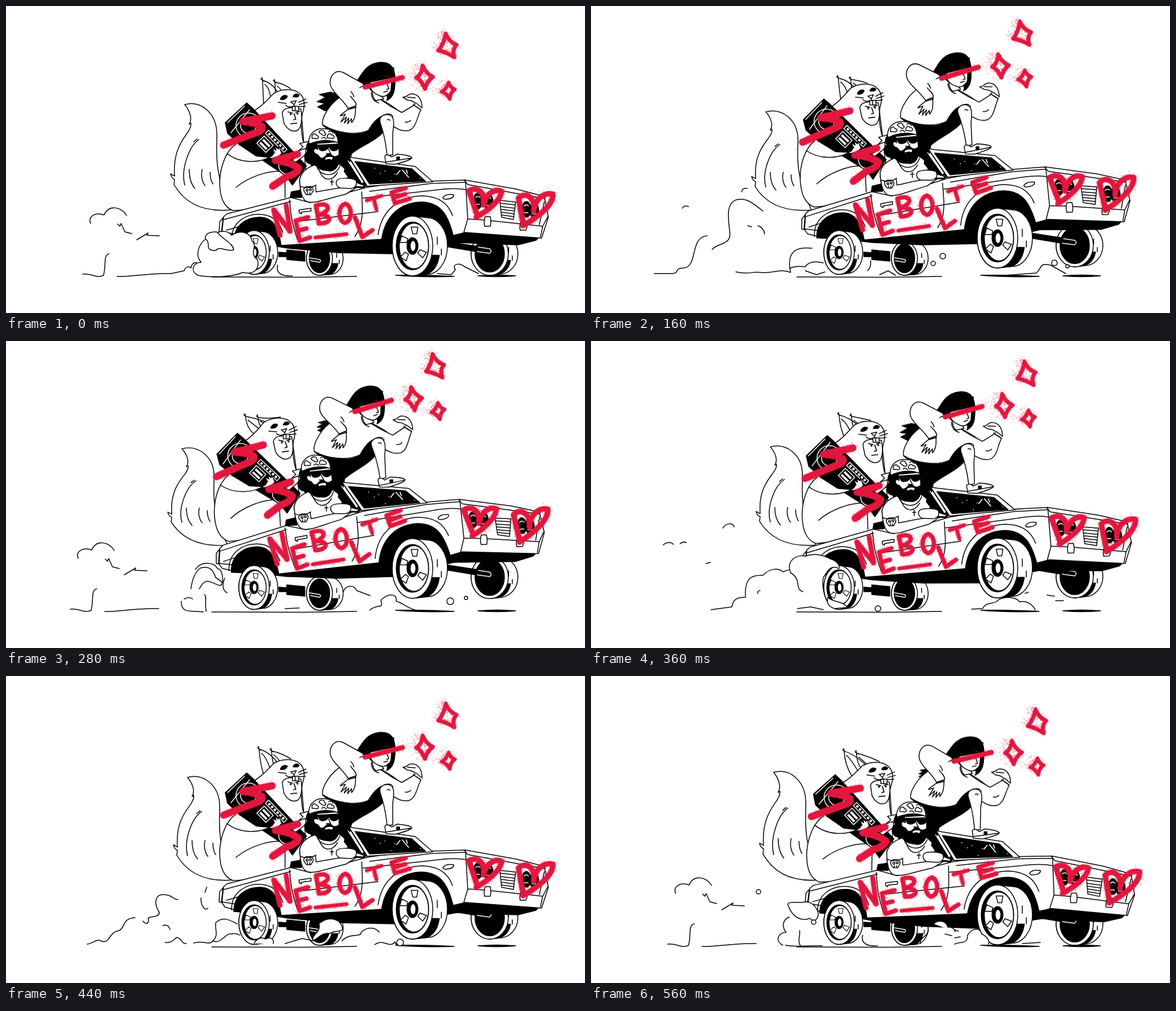
Animation of 1027 by 545 pixels, one loop 0.6 s. Source, as an HTML page:

```html
<!DOCTYPE html>
<html lang="en">
<head>
<meta charset="utf-8">
<title>Joyride</title>
<style>
html, body { margin: 0; width: 100%; height: 100%; overflow: hidden; background: #fff; }
svg { display: block; width: 100vw; height: 100vh; }
path, ellipse, circle, rect { fill: none; stroke: #000; stroke-width: 1.5; stroke-linejoin: round; stroke-linecap: round; }
.w { fill: #fff; }
.k { fill: #000; }
.i { stroke: #fff; }
.p { fill: #fff; stroke: none; }
.r path { stroke: #e3173e; }
</style>
</head>
<body>
<svg viewBox="0 0 1027 545" preserveAspectRatio="none">
  <!-- ground shadows -->
  <path d="M365 481L530 481.500L622 480"/>
  <path class="k" d="M691 478Q745 477 795 480Q740 482 691 478Z"/>
  <path class="k" d="M837 479Q870 476 904 479Q870 482 837 479Z"/>

  <g id="tail">
    <path class="w" d="M317 175C346 167 373 190 374 226C375 250 366 290 398 362C352 366 318 352 298 317L299 308Q293 305 292 298L299 302C297 270 304 250 319 229C325 221 329 214 328 208L325 210C331 200 326 186 317 175Z"/>
    <path d="M342 237C324 250 310 290 317 318M333 241L339 236M325 290C325 305 329 317 335 324M348 290C345 303 349 314 353 319M362 295Q362 308 367 316"/>
  </g>

  <g id="rearFar"></g>
  <path class="k" d="M484 437L498 438V433L530 436V453L498 450V445L484 445Z"/>
  <g id="frontFar"></g>

  <g id="rig">
    <!-- crouching rider -->
    <path id="lock" class="k" d="M602 160L575 153L556 157L567 162L552 170L566 173L553 179L566 186L590 185Z"/>
    <path class="w" d="M640 140C610 150 585 162 572 182C563 195 560 205 562 212C585 224 620 232 645 220C655 205 668 190 680 192L697 197C705 190 690 180 664 165L655 150Z"/>
    <path class="k" d="M562 211C590 228 625 232 642 222C650 208 660 196 672 194L668 225C655 240 630 248 613 262L606 292L585 292L590 240Z"/>
    <path class="w" d="M664 166L682 178L702 189L724 176L736 184C728 200 728 215 715 221C700 224 690 215 684 212L686 195"/>
    <path class="w" d="M724 176C729 171 720 168 712 167L704 162C712 162 712 157 718 156C731 155 738 166 738 181M712 162L726 163M722 175L735 184M727 172L738 181M708 206Q714 207 718 203"/>
    <path class="k" d="M617 139C630 128 634 102 664 100C686 99 690 114 690 130C690 150 688 162 675 168C682 155 660 145 648 150C640 140 628 136 617 139Z"/>
    <path class="w" d="M648 145C651 155 649 162 656 168L670 165L665 157M648 154C648 164 654 170 661 172"/>
    <path class="p" d="M645 136C646 150 655 156 660 158C668 164 678 158 682 150L684 128Z"/>
    <path d="M646 144C649 152 655 156 660 158C668 163 675 160 679 155"/>
    <path class="k" d="M641 136C650 126 672 130 686 124L688 110L650 108Z"/>
    <path class="k" d="M684 126C685 145 683 158 676 167C690 160 690 140 690 126Z"/>
    <path d="M676 139L679 147L675 148M670 153L677 151M648 133Q643 139 649 144"/>
    <path class="w" d="M634 138L598 118C584 112 574 124 575 138C577 152 597 165 607 182L621 177C622 170 615 166 611 160"/>
    <path class="w" d="M608 182C600 190 592 193 593 195L602 192L594 206L604 197L600 208L608 199L606 209L613 200L613 207C620 200 620 190 620 178ZM606 184L621 180M612 152Q616 156 617 161"/>

    <!-- squirrel suit -->
    <path class="w" d="M457 175C440 185 420 200 407 246C390 258 380 285 379 312C379 340 386 356 402 363C440 362 470 352 500 342L534 330L528 240L523 180Z"/>
    <path d="M408 322C428 305 465 290 495 294L495 340"/>
    <path id="ears" class="w"/>
    <path class="w" d="M440 186C455 178 465 165 475 155C490 146 515 145 525 160C530 168 530 180 526 190C522 205 524 225 527 240"/>
    <path class="w" d="M490 190C492 180 505 180 512 181L523 183C526 200 524 215 518 220C508 226 498 218 493 208Z"/>
    <path class="k" d="M487 164Q492 156 499 160Q497 167 487 166ZM509 161Q513 153 520 158Q519 163 509 161Z"/>
    <path class="w" d="M505 170L515 168L511 175ZM508 178H519V186H508ZM513 178V186"/>
    <path d="M511 175V178Q501 181 496 176M519 171L532 165M520 175L534 171M519 179L531 178M497 173L483 171"/>
    <path d="M500 188L508 190M514 189L521 187M511 191L514 201L510 202M505 209L516 208" style="stroke-width:1.7"/>
    <circle class="k" cx="505" cy="192" r="1"/><circle class="k" cx="517" cy="191" r="1"/>
    <path class="k" d="M427 172L437 181L533 284L508 318L497 302L470 284L415 247L393 226L389 207Z"/>
    <path class="i" d="M393 207L423 178M399 225L432 184"/>
    <g transform="translate(430 212) rotate(46)">
      <circle class="i" r="22"/><circle class="i" r="14"/><circle class="i" cx="99" r="15"/>
      <rect class="i" x="33" y="-7" width="23" height="18"/><rect class="p" x="36" y="-3" width="17" height="4"/><rect class="p" x="36" y="4" width="17" height="4"/>
      <rect class="i" x="31" y="-20" width="47" height="8"/><path class="i" d="M35 -16H74" stroke-dasharray="4 3" style="stroke-width:4;stroke-linecap:butt"/>
    </g>
    <path class="w" d="M392 262C415 280 450 280 472 266L476 260L472 252L479 256L477 249L483 254L484 249L487 256L489 262Q483 269 473 270"/>
    <path class="w" d="M528 244C532 255 535 262 526 268L514 277L507 274L513 270L506 269L516 265"/>
    <g class="r">
      <path data-w="12" d="M472 195L420 205Q440 206 454 214Q456 222 440 226L386 247"/>
      <path data-w="12" d="M517 263L478 274Q505 277 519 288Q516 298 498 303L473 320"/>
    </g>

    <!-- driver -->
    <path class="w" d="M538 240L521 244L527 250L519 257L540 250Z"/>
    <path class="k" d="M545 238C535 238 530 250 535 258C528 265 530 280 540 280C545 292 560 290 572 290L588 270L590 240Z"/>
    <path class="w" d="M548 282C530 288 522 298 521 310L523 338L600 335L607 300C604 290 598 285 590 280C580 296 560 296 548 282"/>
    <path d="M552 287C560 304 585 304 592 284M555 290C562 312 578 312 588 296M578 308V318M575 312H581"/>
    <path class="w" d="M551 244L590 241L591 268L575 280L556 272L553 264Q545 262 546 255Q549 251 553 255Z"/>
    <path class="k" d="M553 264L558 270C562 271 565 269 568 265Q573 261 577 264C581 269 586 268 591 264C593 282 585 292 575 293C560 292 554 280 553 264Z"/>
    <path class="k" d="M552 247L591 245C591 256 585 257 581 257C575 257 574 250 572 250C570 257 562 258 557 256Z"/>
    <path class="w" d="M571 252L576 262L568 262"/><path class="p" d="M566 270Q573 266 580 269L578 273Q573 270 567 273Z"/>
    <path class="w" d="M537 241C538 222 555 216 566 218C582 219 589 230 589 243C575 236 555 238 538 245Z"/>
    <path d="M543 235C541 227 549 224 551 230C557 230 554 238 549 235ZM555 224C558 218 566 220 565 225C571 228 564 232 560 228ZM570 234C569 228 575 224 577 229C583 228 584 236 578 235ZM560 235Q564 231 568 236M572 223Q578 220 580 226"/>

    <!-- car -->
    <path class="k" d="M405 414L488 422L668 410L800 395L948 408L940 416L908 424L800 420L690 440L590 438L500 430Z"/>
    <path class="k" d="M504 340L506 330L522 327L524 340Z"/>
    <path class="k" d="M604 272L634 318L612 310L600 294Z"/>
    <path class="w" d="M383 402L386 374L392 369L505 340L540 349L640 322C690 314 760 310 815 309L905 325L955 338L962 375L950 412L815 402L790 408L668 414L488 425L408 416L388 410Z"/>
    <path class="w" d="M608 268L620 270L726 285L757 312L640 320Z"/>
    <path class="k" d="M619 276L720 289L744 311L645 316Z"/>
    <path class="i" d="M664 297h.1M672 293h.1M690 298h.1M654 288h.1M683 310h.1M699 292L693 299M703 291L714 304M710 291L712 297M735 306h.1" style="stroke-width:1.7"/>
    <path class="i" d="M607 275L632 314"/>
    <path d="M608 268L640 319L634 322"/>
    <path d="M387 379L505 347M383 401L408 405M379 383L385 376L382 402L378 401ZM391 398L416 391M503 344C505 370 507 385 517 415M631 330L632 360C632 382 628 395 619 409M512 383L660 365M633 341L760 327Q795 322 815 326M645 329L755 315L815 313"/>
    <path class="w" d="M520 367V362L541 359V364L524 366V369ZM775 340Q780 333 794 335Q795 342 780 343Q775 343 775 340Z"/>
    <path class="k" d="M404 418C404 388 428 374 452 375C476 376 484 398 488 425Z"/>
    <path d="M400 415C400 382 428 368 453 370C476 372 485 385 491 402"/>
    <path class="k" d="M666 416C672 370 702 348 738 348C772 349 785 372 794 411L775 420L690 440Z"/>
    <path d="M660 406C666 362 698 338 738 337C768 338 784 350 792 372"/>
    <path d="M815 309L819 378L812 402M819 378L850 380L952 391L961 374M813 309L819 317L956 342M952 391L948 410M826 324L832 374M955 347L946 388"/>
    <path class="w" d="M876 345L904 348L900 379L879 375ZM876 350L903 353M877 356L902 359M878 361L902 364M878 366L901 369M879 371L901 374"/>
    <g id="lamps"></g>
    <path class="w" d="M850 374H859Q861 383 859 391H849Q847 382 850 374ZM914 382H924Q926 390 922 398H912Q910 390 914 382Z"/>
    <path class="w" d="M521 305C521 325 524 342 533 347C545 353 575 340 603 334L622 322L600 322C580 324 565 328 550 330L549 318"/>
    <path d="M522 320Q535 326 550 318M530 331C525 324 532 319 537 321C544 319 547 327 543 331L541 335L533 335ZM535 331V335M539 331V335"/>
    <circle cx="534" cy="327" r="1.800"/><circle cx="540" cy="326" r="1.800"/>
    <path d="M618 321L633 322Q639 318 634 314" style="stroke-width:3"/>
    <path class="w" d="M586 311C588 304 612 305 620 309C624 316 620 324 610 324L592 323C586 320 585 315 586 311Z"/>

    <!-- planted leg -->
    <path class="w" d="M664 208C660 196 672 190 682 194C688 198 689 206 686 225L686 264L676 266C674 245 670 225 664 208"/>
    <path class="w" d="M672 268C672 264 678 262 684 268L694 263C705 264 716 265 720 269C720 273 705 277 690 281L674 280ZM674 277L719 270M676 202Q679 200 681 203"/>
    <rect class="k" x="693" y="268" width="5" height="5"/>

    <g class="r">
      <path data-w="8" d="M637 144L703 127"/>
      <!-- lettering -->
      <path data-w="8" d="M486 407L475 362L504 400L497 354"/>
      <path data-w="7" d="M536 375L514 381L521 417L539 411M517 399L533 395"/>
      <path data-w="7" d="M550 354L555 386C574 387 584 373 557 370C579 363 573 347 550 354"/>
      <path data-w="7" d="M602 351C588 355 588 381 601 385C615 383 615 355 602 351"/>
      <path data-w="7" d="M619 375L632 410L650 398"/>
      <path data-w="6" d="M640 345L666 337M652 341L657 361"/>
      <path data-w="7" d="M709 323L684 331L690 350L716 342M688 340L708 334"/>
      <path data-w="6" d="M549 411L604 405"/>
      <!-- hearts -->
      <path data-w="9" d="M836 372L821 328C833 321 851 327 847 353C851 332 868 324 879 329C877 347 851 365 834 375"/>
      <path data-w="9" d="M918 389L909 341C922 328 940 341 936 364C938 342 955 330 970 334C971 354 944 374 917 390"/>
      <!-- stars -->
      <path data-w="6.5" data-s="1" d="M780 49Q785 63 799 69Q791 77 795 91Q782 82 767 79Q777 67 780 49Z"/>
      <path data-w="6.5" data-s="1" d="M739 106Q745 120 757 126Q747 133 743 147Q738 133 728 127Q738 121 739 106Z"/>
      <path data-w="6" data-s="1" d="M785 136Q788 145 796 148Q788 153 787 165Q782 155 773 152Q782 147 785 136Z"/>
    </g>
  </g>

  <g id="rearNear"></g>
  <g id="frontNear"></g>
  <g id="dust"></g>
</svg>
<script>
const $ = id => document.getElementById(id);
const STEP = 40, COUNT = 15;

let seed = 7;
const rnd = () => (seed = seed * 16807 % 2147483647) / 2147483647;
const spread = () => rnd() + rnd() + rnd() - 1.5;

// Spray paint: soft halo and seeded speckles around each red stroke
document.querySelectorAll('.r path').forEach(p => {
  const w = +p.dataset.w, star = p.dataset.s, len = p.getTotalLength();
  p.style.strokeWidth = w;
  const halo = p.cloneNode();
  halo.style.strokeWidth = w + 2.5;
  halo.style.opacity = 0.35;
  let d = '';
  for (let i = 0; i < len * (star ? 2.5 : 2); i++) {
    const q = p.getPointAtLength(rnd() * len), far = star ? rnd() * rnd() : 0;
    d += `M${(q.x + spread() * w * 1.1 - far * 20).toFixed(1)} ${(q.y + spread() * w * 1.1 - far * 8).toFixed(1)}h.1`;
  }
  const dots = p.cloneNode();
  dots.setAttribute('d', d);
  dots.style.strokeWidth = 0.9;
  p.before(halo);
  p.after(dots);
});

const oval = (cls, x, y, rx, ry) => `<ellipse class="${cls}" cx="${x}" cy="${y}" rx="${rx}" ry="${ry}"/>`;

function tyre(x, y, rx, ry, dx) {
  const b = ry * 0.95, X = x + dx;
  return `<path class="w" d="M${x} ${y - ry}L${X} ${y - b}A${rx} ${b} 0 0 1 ${X} ${y + b}L${x} ${y + ry}A${rx} ${ry} 0 0 1 ${x} ${y - ry}Z"/>
    <path class="k" d="M${x} ${y + ry}A${rx} ${ry} 0 0 0 ${x + rx * 0.95} ${y + ry * 0.31}L${X + rx * 0.6} ${y + ry * 0.31}Q${X + rx * 0.5} ${y + ry * 0.8} ${X} ${y + b}Z"/>
    <path d="M${X + rx * 0.5} ${y - ry * 0.3}v${ry * 0.25}M${X + rx * 0.7} ${y + ry * 0.1}v${ry * 0.2}"/>` + oval('w', x, y, rx, ry);
}

function nearWheel(x, y, rx, ry, dx) {
  const vent = (u, v, a) => `<path class="w" transform="translate(${x + u * rx} ${y + v * ry}) rotate(${a}) scale(${rx / 36})" d="M-6 -6L6 -6L4 6L-3 6Z"/>`;
  return tyre(x, y, rx, ry, dx) + oval('k', x, y, rx * 0.8, ry * 0.8) + oval('p', x + rx * 0.07, y, rx * 0.7, ry * 0.75) +
    vent(0.1, -0.52, 0) + vent(0.46, 0.24, 125) + vent(-0.36, 0.34, 215) + vent(-0.42, -0.2, 285) +
    oval('k', x, y, rx * 0.27, ry * 0.28) + oval('p', x + 1, y, rx * 0.12, ry * 0.17);
}

const farWheel = (x, y, rx, ry, dx) => tyre(x, y, rx, ry, dx) + oval('k', x, y, rx * 0.79, ry * 0.85);

$('rearNear').innerHTML = nearWheel(440, 437.500, 27, 39, 15);
$('frontNear').innerHTML = nearWheel(721, 426, 36, 53, 26);
$('rearFar').innerHTML = farWheel(556, 448, 23, 30, 19) + '<path class="i" d="M538 447L556 450Q560 452 556 455L540 452"/>';
$('frontFar').innerHTML = farWheel(858, 440, 33, 38, 17) +
  '<path class="k" d="M780 418L858 430Q864 435 858 440L780 427Z"/><path class="i" d="M838 428L858 431Q863 435 858 439L836 436"/>';
$('lamps').innerHTML = [[837, 346], [856, 348], [923, 361], [937, 363]].map(([x, y]) =>
  oval('k', x, y, 8, 14) + `<path class="i" d="M${x - 4} ${y - 6}q4 -4 8 0M${x - 4} ${y + 6}h7"/>`).join('');

// Dust drawings: open lines, white puffs, pebbles
const line = d => `<path d="${d}"/>`, puff = d => `<path class="w" d="${d}"/>`;
const stone = (x, y, r) => `<circle class="w" cx="${x}" cy="${y}" r="${r}"/>`;
const drift = 'M150 386C145 372 160 366 174 371C182 352 205 356 214 372M198 387L202 391L204 386L211 401L223 404M232 415L252 403L250 407L272 408M183 440C172 442 178 460 173 478C160 485 155 474 136 476M197 480C215 482 250 474 293 475';

const dust = [
  line(drift + 'L316 470C318 462 325 462 328 465C330 455 335 456 338 455M482 460C478 475 490 480 508 479M765 475L790 477L797 468C790 458 805 455 812 462L838 475') +
    puff('M340 478C325 470 333 455 346 455C333 440 345 420 354 414C350 400 375 400 375 402C385 398 395 400 400 407C420 395 435 405 436 417C448 425 430 440 446 450C450 465 442 478 420 473C400 482 360 482 340 478Z') +
    line('M354 414C365 420 350 435 372 434M375 402C385 415 402 420 404 433C390 437 380 425 372 434'),
  puff('M342 408C338 385 345 372 362 377C375 368 395 370 404 380C412 390 400 400 405 420C390 430 375 428 362 415C352 420 346 418 342 408Z') +
    line('M170 362C178 356 182 360 184 364C195 360 205 362 209 367M237 396L241 394L250 395M131 475L152 476C165 474 168 470 163 458L179 456M206 476L230 479L225 473C228 460 250 462 248 445C248 410 290 400 313 416M334 444C328 448 328 452 332 456M495 475L525 470L530 464M600 470C598 455 620 445 623 440C635 435 645 445 645 450M645 470L663 474L650 478L672 472M655 468C665 445 690 450 695 460L710 475') +
    puff('M338 476L360 474C365 462 375 464 378 468C390 457 398 460 400 464C405 448 430 445 439 474') + stone(678, 454, 5) + stone(645, 447, 3),
  line('M162 359Q166 353 173 356M267 330Q269 322 277 324M112 475L140 475C160 476 145 465 165 465C190 462 175 410 206 408M215 432C225 420 250 425 246 400C244 380 238 350 258 344C275 340 285 348 305 364M278 390L285 392M296 390Q307 394 308 405M257 472C280 478 290 470 300 473C320 476 335 465 354 473C345 430 370 428 392 430M352 466C360 462 372 462 380 463C385 455 395 452 412 456M380 470L400 477L415 472M490 470Q497 465 496 452M512 477L527 470L540 478M735 478L790 474C800 465 795 455 815 460L842 475') +
    stone(607, 457, 4) + stone(624, 444, 5) + stone(822, 456, 5) + stone(845, 462, 3),
  `<g transform="translate(-22)">${line(drift)}</g>` +
    line('M328 440C330 425 335 410 345 403C362 398 368 408 372 420C380 425 388 430 380 434C365 432 355 415 343 440M336 406C345 390 370 392 375 404C382 405 385 415 384 428M355 480C352 465 357 455 352 450M311 462C310 485 330 478 350 481M316 458Q325 453 331 458M388 421Q380 440 392 447M598 445C605 430 620 435 622 443L646 452M645 478C660 465 670 478 665 460C680 445 695 450 692 462C705 465 710 475 735 480M495 475L520 474') +
    stone(788, 462, 6) + stone(816, 456, 3),
  line('M128 362C135 356 143 357 146 361M158 360Q163 355 169 358M234 332C240 322 252 323 254 330M204 395L212 393M213 477L250 472C252 455 265 455 274 455C272 420 285 415 305 416C320 400 335 405 341 410C348 405 365 405 371 409M296 448Q295 443 300 443M366 475L390 472L412 477M809 451L822 453M824 461L838 461M770 448L776 446') +
    puff('M376 445C360 440 375 425 355 412C345 395 360 378 380 382C400 375 415 382 425 387C443 392 443 410 436 402C425 400 422 404 412 420C410 435 412 440 414 450') +
    puff('M420 455C430 465 445 460 455 473L432 475Q416 470 420 455Z') +
    puff('M675 476L695 475C700 462 718 468 722 460C735 452 755 455 760 463C775 460 785 470 788 478') + stone(509, 475, 5),
  line('M144 476C155 475 160 465 170 471C185 475 182 455 200 452C212 448 205 430 229 429M243 435C250 445 255 435 252 430C258 425 270 430 272 420C260 400 265 382 290 390C300 395 300 397 305 397M278 443Q288 440 291 450M282 473C295 475 300 465 303 464C315 468 310 475 320 475M356 375L353 384M346 394C345 410 355 418 358 412M333 474C350 468 360 480 367 470C378 460 370 450 372 438C385 425 400 435 410 440M367 470C380 478 390 455 400 458C410 455 412 460 415 460M495 475L525 466L545 470M596 470C610 455 630 465 630 455C640 445 655 445 662 455M654 477C670 465 680 485 690 472C692 480 700 478 704 470') +
    puff('M545 470C540 460 560 455 555 440C570 425 596 430 597 450C590 455 580 452 575 457C560 455 555 465 545 470Z') +
    puff('M440 475C445 465 455 463 460 467C470 462 476 468 474 475') + stone(699, 473, 6),
  line(drift + 'M340 478C325 470 333 455 346 455C335 440 345 430 352 428M372 480C365 470 372 460 370 452M345 478C365 482 390 478 410 479M482 460C478 475 490 480 508 479M585 475C580 465 600 462 598 450M628 458L640 461M643 450L652 453M645 465L655 463M765 475L797 473') +
    puff('M350 408C345 400 360 402 375 402C388 398 398 406 403 420C404 433 395 438 388 430C375 436 358 430 350 408Z') +
    puff('M608 440C615 432 630 434 633 446C640 445 644 448 646 454M645 476C655 470 668 478 668 460C675 448 690 445 693 458C702 462 708 470 705 476') + stone(297, 383, 4) + stone(395, 437, 4)
];
const dustAt = [0, 1, 1, 2, 2, 3, 3, 3, 4, 4, 5, 5, 5, 6, 6];

// Key poses, linear between
const keys = [0, 2, 4, 6, 9, 11, 14, 15];
const pose = {
  tilt: [0, 1.2, 2.4, 3.6, 1.4, 0, -1.1],
  tailX: [0, -4, -7, -8, 1, 5, 7],
  tailY: [0, 7, 13, 18, 13, 5, -4],
  nearY: [0, -10, -14, -22, -23, -12, -2],
  farY: [0, -6, -15, -20, -22, -11, 0],
  earX: [455, 440, 454, 440, 449, 449, 442],
  earY: [132, 139, 136, 146, 136, 130, 130],
  lock: [1, 0.6, 0.05, 0.5, 0.9, 0.2, 0.5]
};

function at(name, k) {
  const v = pose[name];
  let i = 0;
  while (k >= keys[i + 1]) i++;
  const u = (k - keys[i]) / (keys[i + 1] - keys[i]);
  return v[i] + (v[(i + 1) % v.length] - v[i]) * u;
}

const move = (id, value) => $(id).setAttribute('transform', value);

function ear(x, y, bx, by) {
  return `M${bx} ${by}Q${x + 1} ${y + 22} ${x} ${y}Q${x + 18} ${y + 4} ${bx + 27} ${by - 18}M${x} ${y}l-3 -3M${x} ${y}l-1 -5M${x + 4} ${y + 7}Q${x + 14} ${y + 15} ${bx + 13} ${by - 5}l-4 -2l3 5`;
}

function draw(k) {
  move('rig', `rotate(${-at('tilt', k)} 256 500)`);
  move('tail', `translate(${at('tailX', k)} 365) scale(1 ${1 - at('tailY', k) / 191}) translate(0 -365)`);
  move('frontNear', `translate(0 ${at('nearY', k)})`);
  move('frontFar', `translate(0 ${at('farY', k)})`);
  move('lock', `translate(597 165) scale(${at('lock', k)}) translate(-597 -165)`);
  const x = at('earX', k), y = at('earY', k);
  $('ears').setAttribute('d', ear(x + 22, y + 3, 478, 165) + ear(x, y, 457, 175));
  $('dust').innerHTML = dust[dustAt[k]];
}

let shown = -1;
function tick() {
  const k = Math.floor((performance.now() + 0.5) / STEP) % COUNT;
  if (k !== shown) draw(shown = k);
  requestAnimationFrame(tick);
}
tick();
</script>
</body>
</html>
```
